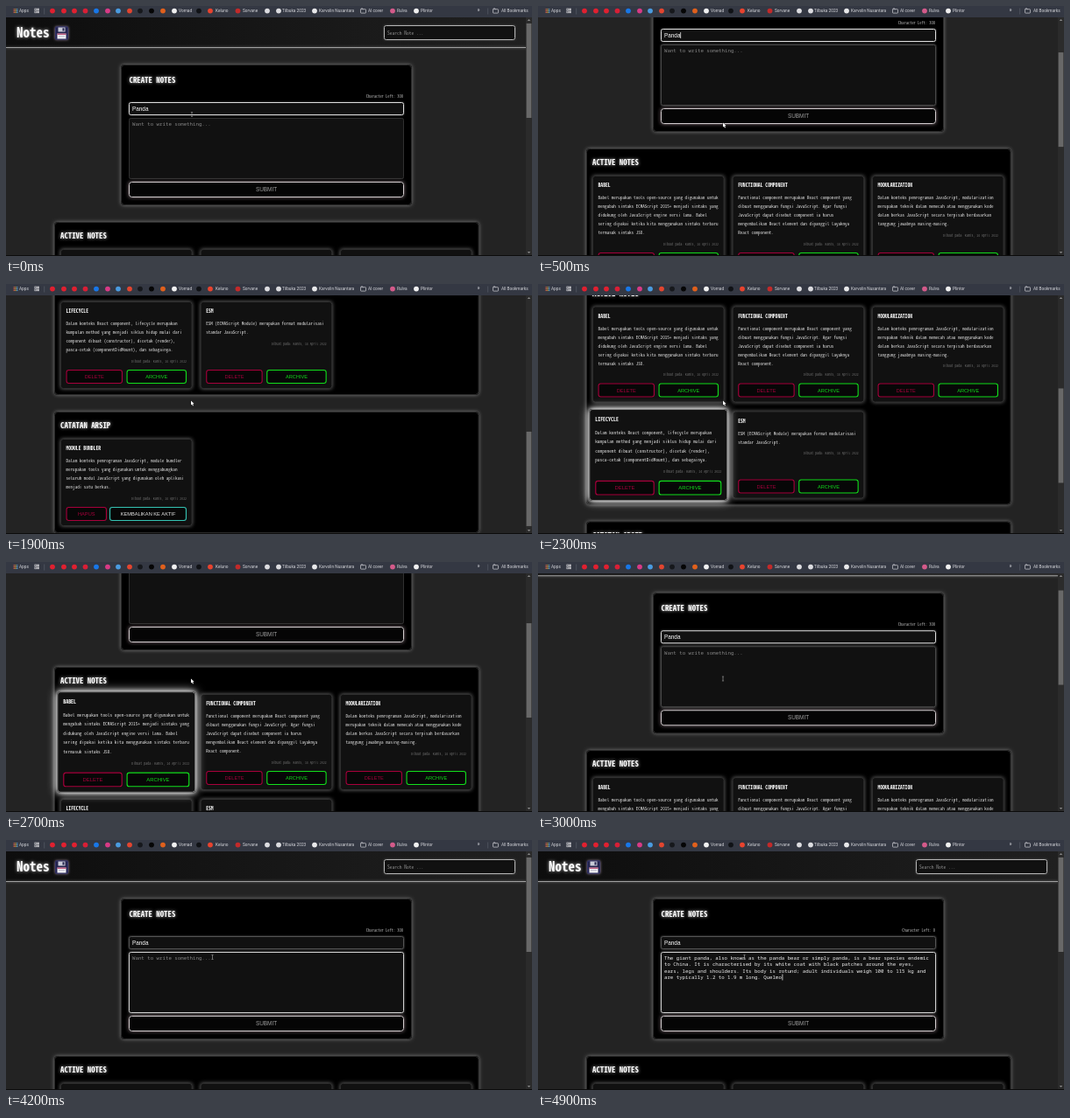
An HTML page with a canvas for the animation above (5000 ms loop, 600 by 286 pixels).

```html
<!DOCTYPE html>
<html lang="en">
<head>
<meta charset="utf-8">
<title>Notes</title>
<style>
html, body { margin: 0; width: 100%; height: 100%; overflow: hidden; background: #222; }
canvas { display: block; width: 600px; height: 286px; }
</style>
</head>
<body>
<canvas id="stage"></canvas>
<script>
const W = 600, H = 286, LOOP = 5000, STEP = 100;
const PASTE = 4500, FOCUS = 3800;
const canvas = document.getElementById('stage');
const dpr = window.devicePixelRatio || 1;
canvas.width = W * dpr;
canvas.height = H * dpr;
const c = canvas.getContext('2d');

const UI = '"Noto Sans Mono CJK JP", "Noto Sans Mono", monospace';
const CODE = '"Noto Sans Mono", "DejaVu Sans Mono", monospace';
const SANS = '"Liberation Sans", Arial, sans-serif';
const BAR = 'Roboto, "Noto Sans", sans-serif';

const DATE = 'Dibuat pada: Kamis, 14 April 2022';
const RED = '#a8003c', GREEN = '#12e01c', TEAL = '#35c4b4';
const ACTIVE = [['DELETE', RED, 6.5, 64.5], ['ARCHIVE', GREEN, 75.5, 68.5]];
const ARCHIVED = [['HAPUS', RED, 6.5, 46.5], ['KEMBALIKAN KE AKTIF', TEAL, 56, 88, '#eee']];

const cards = [
  { x: 62, y: 278, h: 110, title: 'BABEL', buttons: ACTIVE, lines: [
    'Babel merupakan tools open-source yang digunakan untuk',
    'mengubah sintaks ECMAScript 2015+ menjadi sintaks yang',
    'didukung oleh JavaScript engine versi lama. Babel',
    'sering dipakai ketika kita menggunakan sintaks terbaru',
    'termasuk sintaks JSX.'] },
  { x: 221.7, y: 278, h: 110, title: 'FUNCTIONAL COMPONENT', buttons: ACTIVE, lines: [
    'Functional component merupakan React component yang',
    'dibuat menggunakan fungsi JavaScript. Agar fungsi',
    'JavaScript dapat disebut component ia harus',
    'mengembalikan React element dan dipanggil layaknya',
    'React component.'] },
  { x: 381, y: 278, h: 110, title: 'MODULARIZATION', buttons: ACTIVE, lines: [
    'Dalam konteks pemrograman JavaScript, modularization',
    'merupakan teknik dalam memecah atau menggunakan kode',
    'dalam berkas JavaScript secara terpisah berdasarkan',
    'tanggung jawabnya masing-masing.'] },
  { x: 62, y: 398, h: 100, title: 'LIFECYCLE', buttons: ACTIVE, lines: [
    'Dalam konteks React component, lifecycle merupakan',
    'kumpulan method yang menjadi siklus hidup mulai dari',
    'component dibuat (constructor), dicetak (render),',
    'pasca-cetak (componentDidMount), dan sebagainya.'] },
  { x: 221.7, y: 398, h: 100, title: 'ESM', buttons: ACTIVE, lines: [
    'ESM (ECMAScript Module) merupakan format modularisasi',
    'standar JavaScript.'] },
  { x: 62, y: 555, h: 100, title: 'MODULE BUNDLER', buttons: ARCHIVED, lines: [
    'Dalam konteks pemrograman JavaScript, module bundler',
    'merupakan tools yang digunakan untuk menggabungkan',
    'seluruh modul JavaScript yang digunakan oleh aplikasi',
    'menjadi satu berkas.'] }
];

const PASTED = [
  'The giant panda, also known as the panda bear or simply panda, is a bear species endemic',
  'to China. It is characterised by its white coat with black patches around the eyes,',
  'ears, legs and shoulders. Its body is rotund; adult individuals weigh 100 to 115 kg and',
  'are typically 1.2 to 1.9 m long. Quelmo'
];

// Piecewise linear value through [time, value] points.
function track(points, t) {
  if (t <= points[0][0]) return points[0][1];
  for (let i = 1; i < points.length; i++) {
    const [t1, v1] = points[i], [t0, v0] = points[i - 1];
    if (t <= t1) return v0 + (v1 - v0) * (t - t0) / (t1 - t0);
  }
  return points[points.length - 1][1];
}

// 0..1 transition in and out of a time window.
function pulse(t, from, to, fade = 150) {
  const k = Math.max(0, Math.min(1, (t - from) / fade, 1 - (t - to) / fade));
  return k * k * (3 - 2 * k);
}

const ratios = {};
function pitchSize(pitch, family, weight) {
  const key = weight + family;
  if (!ratios[key]) {
    c.font = `${weight} 100px ${family}`;
    ratios[key] = c.measureText('0').width / 100;
  }
  return pitch / ratios[key];
}

function text(str, x, y, size, color, { family = SANS, weight = 400, align = 'left', glow = 0 } = {}) {
  c.save();
  c.font = `${weight} ${size}px ${family}`;
  c.textAlign = align;
  c.fillStyle = color;
  if (glow) { c.shadowColor = 'rgba(255,255,255,.8)'; c.shadowBlur = glow * dpr; }
  c.fillText(str, x, y + size * 0.36);
  c.restore();
}

function mono(str, x, y, pitch, color, opts = {}) {
  const { family = UI, weight = 400 } = opts;
  text(str, x, y, pitchSize(pitch, family, weight), color, { ...opts, family, weight });
}

function box(x, y, w, h, r, fill, stroke, glow = 0, glowColor = '#fff', line = 1) {
  c.save();
  c.beginPath();
  c.roundRect(x, y, w, h, r);
  if (glow) { c.shadowColor = glowColor; c.shadowBlur = glow * dpr; }
  c.fillStyle = fill;
  c.fill();
  c.shadowBlur = 0;
  c.shadowColor = 'transparent';
  if (stroke) {
    c.beginPath();
    c.roundRect(x + line / 2, y + line / 2, w - line, h - line, r);
    c.strokeStyle = stroke;
    c.lineWidth = line;
    c.stroke();
  }
  c.restore();
}

function rect(x, y, w, h, color) {
  c.fillStyle = color;
  c.fillRect(x, y, w, h);
}

function dot(x, y, r, color) {
  c.beginPath();
  c.arc(x, y, r, 0, Math.PI * 2);
  c.fillStyle = color;
  c.fill();
}

function panel(x, y, w, h) {
  box(x, y, w, h, 4, '#000', '#3c3c3c', 4, 'rgba(255,255,255,.42)', 0.8);
}

function heading(str, x, y) {
  mono(str, x, y, 4.4, '#fff', { weight: 700, glow: 3.5 });
}

function drawCard(card, hover) {
  const { x, y, h, title, lines, buttons } = card, w = 150.5;
  c.save();
  const s = 1 + 0.048 * hover;
  c.translate(x + w / 2, y + h / 2);
  c.scale(s, s);
  c.translate(-x - w / 2, -y - h / 2);
  box(x, y, w, h, 3, '#111', hover > 0.3 ? '#999' : '#3c3c3c', 4 + 8 * hover,
    `rgba(255,255,255,${0.42 + 0.58 * hover})`, 0.8);
  if (hover > 0.3) box(x, y, w, h, 3, '#111', '#999', 5, `rgba(255,255,255,${hover})`, 0.8);
  mono(title, x + 6.5, y + 11.3, 2.83, '#fff', { weight: 700 });
  lines.forEach((s, i) => mono(s, x + 6.5, y + 25.5 + i * 10, 2.54, '#e4e4e4'));
  mono(DATE, x + w - 6.5, y + 28.3 + lines.length * 10, 1.91, '#6c6c6c', { align: 'right' });
  for (const [label, color, dx, bw, ink] of buttons) {
    box(x + dx, y + h - 22, bw, 16, 2.5, '#070707', color, 0, '', 1.1);
    text(label, x + dx + bw / 2, y + h - 14, 5.65, ink || color, { align: 'center' });
  }
  c.restore();
}

function drawFloppy(x, y) {
  box(x, y, 15, 15, 1.5, '#24244e', '#34346a', 3, 'rgba(235,205,235,.7)');
  rect(x + 3.5, y + 1, 8, 5, '#c9cbd8');
  rect(x + 8.5, y + 1.8, 2, 3.2, '#24244e');
  rect(x + 2.5, y + 8, 10, 6, '#f2f2f6');
  rect(x + 2.5, y + 8, 10, 1.4, '#b64a72');
  rect(x + 4, y + 11, 7, 0.7, '#9a9ab0');
}

function drawHeader() {
  const shade = c.createLinearGradient(0, 0, 593, 0);
  shade.addColorStop(0, '#0d0d0d');
  shade.addColorStop(1, '#202020');
  rect(0, 13, 593, 34.5, shade);
  c.save();
  c.shadowColor = 'rgba(255,255,255,.4)';
  c.shadowBlur = 3 * dpr;
  rect(0, 47, 593, 1, '#a0a0a0');
  c.restore();
  mono('Notes', 12, 31, 7.5, '#fff', { weight: 700, glow: 3.5 });
  drawFloppy(56, 23.5);
  box(431, 22, 150, 17, 2, '#111', '#b5b5b5', 2, 'rgba(255,255,255,.3)');
  mono('Search Note ...', 435, 30.7, 2.75, '#939393');
}

function drawForm(t) {
  const pasted = t >= PASTE, inArea = t >= FOCUS, caret = t % 1000 >= 500;
  const over = Math.max(pulse(t, 100, 400, 200), pulse(t, 2900, FOCUS));
  panel(131, 67, 332, 161);
  heading('CREATE NOTES', 140.5, 84.5);
  mono('Character Left: ' + (pasted ? 0 : 300), 453, 103, 2.22, '#c4c4c4', { align: 'right' });

  box(140, 110, 314, 15, 2, '#111', inArea ? '#555' : '#dedede', 2, 'rgba(255,255,255,.4)');
  text('Panda', 144, 117.3, 6.4, '#fff');
  if (caret && !inArea) rect(162.4, 114, 0.7, 7, '#fff');

  const edge = inArea ? '#d0d0d0' : over > 0.3 ? '#484848' : '#303030';
  box(140, 128, 314, 70, 2, '#111', edge, inArea ? 3 : 4 * over, 'rgba(255,255,255,.45)');
  if (pasted) {
    PASTED.forEach((s, i) => mono(s, 144, 135 + i * 7.25, 3.44, '#f2f2f2', { family: CODE }));
  } else {
    mono('Want to write something...', 144, 135.3, 3.46, '#858585', { family: CODE });
  }
  if (caret && inArea) {
    const end = pasted ? [144 + PASTED[3].length * 3.44 + 0.4, 153.5] : [144, 132];
    rect(end[0], end[1], 0.7, 7, '#fff');
  }

  box(140, 201, 314, 18, 3, '#050505', '#d4ced0', 4, 'rgba(255,220,232,.5)');
  text('SUBMIT', 297, 209.9, 6.4, '#a0a0a0', { align: 'center' });
}

function drawPage(t, scroll) {
  c.save();
  c.beginPath();
  c.rect(0, 13, 593, H - 13);
  c.clip();
  rect(0, 13, 593, H, '#232323');
  c.translate(0, -scroll);
  drawHeader();
  drawForm(t);
  panel(55, 247, 484.5, 258);
  heading('ACTIVE NOTES', 62, 263);
  panel(55, 524, 484.5, 139);
  heading('CATATAN ARSIP', 62, 540.3);
  const hovers = [
    Math.max(pulse(t, 750, 1100), pulse(t, 2370, 2720)), 0, 0,
    Math.max(pulse(t, 1150, 1400), pulse(t, 2000, 2300)), 0, 0
  ];
  cards.forEach((card, i) => { if (!hovers[i]) drawCard(card, 0); });
  cards.forEach((card, i) => { if (hovers[i]) drawCard(card, hovers[i]); });
  c.restore();
}

function drawScrollbar(scroll) {
  rect(593, 13, 7, H - 13, '#2b2b2b');
  rect(593.6, 20 + scroll * 0.394, 5.8, 108, '#686868');
  c.fillStyle = '#8a8a8a';
  for (const [y, d] of [[16, 1], [282, -1]]) {
    c.beginPath();
    c.moveTo(596.5, y - d);
    c.lineTo(598.2, y + d);
    c.lineTo(594.8, y + d);
    c.fill();
  }
}

function folder(x) {
  c.strokeStyle = '#cfcfd4';
  c.lineWidth = 0.7;
  c.beginPath();
  c.roundRect(x - 3, 3.7, 6, 4.4, 0.6);
  c.moveTo(x - 3, 3.7);
  c.lineTo(x - 2.4, 2.9);
  c.lineTo(x - 0.6, 2.9);
  c.lineTo(x, 3.7);
  c.stroke();
}

const icons = [
  [53, '#e02030'], [66, '#e02030'], [78, '#e02030'], [90.5, '#d81f36'], [103, '#1877e8'],
  [116, '#d83a86'], [128, '#4a9be0'], [141, '#e2452f'], [153, '#16181c'], [166, '#050505'],
  [179, '#e0601c'], [192, '#f0f0f0'], [220, '#101216'], [233, '#e8432e'], [264.5, '#c22a2a'],
  [298, '#dcdce0'], [311, '#dcdce0'], [352, '#e8e8ea'], [441, '#d45a8a'], [468, '#f0f0f0']
];
const labels = [
  [15, 'Apps'], [197, 'Vornad'], [239, 'Keluno'], [270, 'Sorvane'], [315, 'Tilbuka 2023'],
  [357, 'Karvolin Nusantara'], [413, 'AI cover'], [446, 'Rulva'], [473, 'Plintor'], [565, 'All Bookmarks']
];

function drawBar() {
  rect(0, 0, W, 13, '#343843');
  for (let i = 0; i < 9; i++) {
    rect(8.6 + (i % 3) * 1.8, 3.2 + Math.floor(i / 3) * 1.8, 1.2, 1.2, ['#e0604c', '#e0b040', '#58a8e0'][i % 3]);
  }
  c.strokeStyle = '#c8c8cc';
  c.lineWidth = 0.7;
  for (let i = 0; i < 4; i++) c.strokeRect(32.8 + (i % 2) * 2.9, 3 + (i >> 1) * 2.9, 1.9, 1.9);
  rect(43.5, 2.5, 0.6, 7, '#5c606c');
  rect(549.5, 2.5, 0.6, 7, '#5c606c');
  icons.forEach(([x, color]) => dot(x, 5.6, 2.9, color));
  folder(407.5);
  folder(558.5);
  labels.forEach(([x, s]) => text(s, x, 5.5, 4.75, '#d6d7dc', { family: BAR }));
  text('»', 537.5, 5, 6.5, '#d6d7dc', { family: BAR });
}

function drawPointer(t) {
  const x = track([[0, 212], [200, 211], [3100, 211], [3500, 215.5], [3900, 235.5]], t);
  const y = track([[0, 124], [200, 133.5], [3100, 133.5], [3500, 143], [3900, 134]], t);
  if (t < 400 || t >= 2900) {
    rect(x - 0.35, y - 2.5, 0.7, 5, '#9a9a9a');
    rect(x - 1.1, y - 2.8, 2.2, 0.6, '#9a9a9a');
    rect(x - 1.1, y + 2.2, 2.2, 0.6, '#9a9a9a');
    return;
  }
  c.save();
  c.translate(x, y);
  c.beginPath();
  [[0, 0], [0, 5], [1.1, 4], [2, 5.9], [2.9, 5.5], [2.1, 3.7], [3.6, 3.6]]
    .forEach(([px, py]) => c.lineTo(px, py));
  c.closePath();
  c.strokeStyle = '#111';
  c.lineWidth = 0.8;
  c.stroke();
  c.fillStyle = '#fff';
  c.fill();
  c.restore();
}

function draw(t) {
  c.setTransform(dpr, 0, 0, dpr, 0, 0);
  const scroll = track([[230, 0], [500, 84], [1000, 241], [1440, 378], [1900, 378], [2700, 127], [3100, 0]], t);
  drawPage(t, scroll);
  drawScrollbar(scroll);
  drawBar();
  rect(0, 285, W, 1, '#0c0c0c');
  drawPointer(t);
}

const start = performance.now();
function tick() {
  const t = (performance.now() - start) % LOOP;
  draw(Math.floor(t / STEP) * STEP);
  requestAnimationFrame(tick);
}
tick();
</script>
</body>
</html>
```
